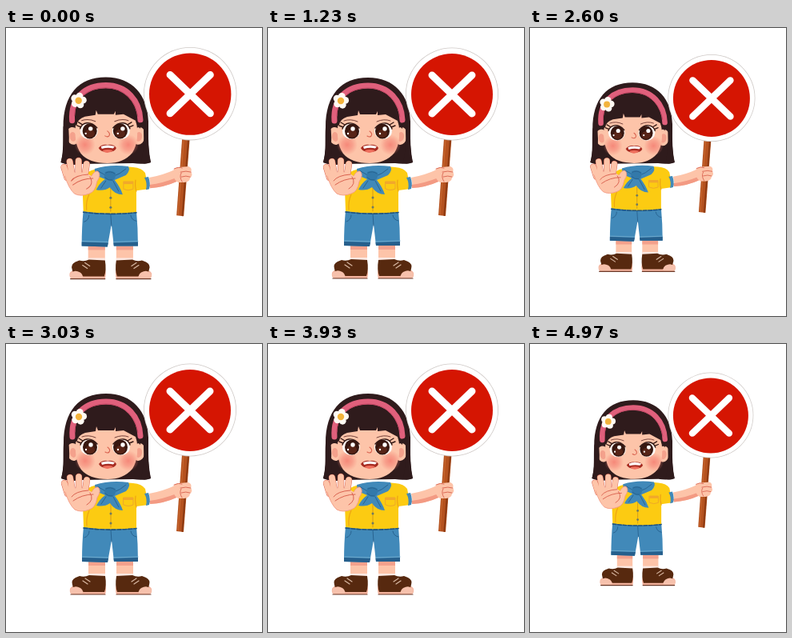
Recreate the animation shown at these times as an HTML page with a canvas. Size 320 by 360 pixels, loop 5.01 s.

```html
<!DOCTYPE html>
<html lang="en">
<head>
<meta charset="utf-8">
<title>Girl with a stop sign</title>
<style>
html, body { margin: 0; width: 100%; height: 100%; overflow: hidden; background: #fff; }
canvas { display: block; width: 320px; height: 360px; }
</style>
</head>
<body>
<canvas id="stage" width="320" height="360"></canvas>
<script>
const ctx = document.getElementById('stage').getContext('2d');
const LOOP = 5010, STEPS = 150, BEAT = 27;
const PIVOT = { x: 177.5, y: 167 };
const C = {
  hair: '#2f1b1c', skin: '#fdc4a9', shade: '#f39a83', line: '#d9624f',
  band: '#e0607c', red: '#d51502', yellow: '#fccb12', gold: '#eda313',
  blue: '#4189b9', navy: '#265f8c', brown: '#57290f', wood: '#b5521f'
};

// Scale over one beat: [step, scale]
const KEYS = [[0, 1.004], [4, 1.135], [5, 1.137], [9, 1.027], [10, 1],
  [14, 0.922], [16, 0.89], [18.5, 0.868], [21, 0.89], [23, 0.922], [26, 0.979], [27, 1.004]];

function scaleAt(step) {
  const p = step % BEAT;
  const i = KEYS.findIndex(k => k[0] > p);
  const [a, s] = KEYS[i - 1], [b, e] = KEYS[i];
  return s + (e - s) * (p - a) / (b - a);
}

function stepAt(ms) {
  let n = Math.min(STEPS - 1, Math.ceil(ms * 0.03) + 1);
  while (n > 0 && Math.round(n * 10 / 3) * 10 > ms) n--;
  return n;
}

function fill(d, color) {
  ctx.fillStyle = color;
  ctx.fill(new Path2D(d));
}

function stroke(d, color, width = 1) {
  ctx.strokeStyle = color;
  ctx.lineWidth = width;
  ctx.stroke(new Path2D(d));
}

function oval(x, y, rx, ry, color, turn = 0) {
  ctx.beginPath();
  ctx.ellipse(x, y, rx, ry, turn, 0, Math.PI * 2);
  ctx.fillStyle = color;
  ctx.fill();
}

function dot(x, y, r, color) {
  oval(x, y, r, r, color);
}

function glow(x, y, r) {
  const g = ctx.createRadialGradient(x, y, 0, x, y, r);
  g.addColorStop(0, 'rgba(243,116,105,.75)');
  g.addColorStop(0.5, 'rgba(243,125,112,.5)');
  g.addColorStop(1, 'rgba(243,130,115,0)');
  dot(x, y, r, g);
}

function sign() {
  fill('M220 138 L229.5 138 L222 235 L213 234Z', C.wood);
  stroke('M227.8 140 L220.4 234', '#8c3a12', 2);
  stroke('M222 140 L215 233', '#c96a31', 1);
  dot(230, 82.5, 58, '#cfc9c6');
  dot(230, 82.5, 57.2, '#fff');
  dot(230, 83, 51, C.red);
  stroke('M205 59 L255 107 M255 59 L205 107', '#fff', 9);
}

function hairBack() {
  fill('M69 168 C73 154 71 139 72 124 C72 84 91 62 125 62 C158 62 177 84 178 117 C178 139 177 153 181 168 Q172 171 159 169 L92 170 Q80 173 69 168Z', C.hair);
}

function legs() {
  for (const x of [103, 138]) {
    ctx.fillStyle = C.skin;
    ctx.fillRect(x, 270, 21, 24);
    ctx.fillStyle = '#f4a18c';
    ctx.fillRect(x, 272, 21, 5);
    ctx.fillStyle = '#fbe9e3';
    ctx.fillRect(x, 287, 21, 8);
  }
  shoe();
  ctx.save();
  ctx.translate(262, 0);
  ctx.scale(-1, 1);
  shoe();
  ctx.restore();
}

function shoe() {
  fill('M80 306 Q82 302 88 302 L124 300 Q126 307 124 313 L83 313 Q79 312 80 306Z', '#f4b39d');
  fill('M83 301 Q81 295 87 292 L92 290 Q98 292 104 289 L124 290 Q126 302 123 310 L97 310 Q90 306 84 305 Z', C.brown);
  fill('M81 306 Q86 301 93 305 Q97 308 96 312 L82 312 Q79 310 81 306Z', '#f6c1ac');
  stroke('M81 313 H124', '#6b3928', 1.2);
  stroke('M99 293 L105 297 M96 296 L102 300', '#d9b9a4', 1.2);
}

function shorts() {
  fill('M97 228 L163 228 Q165 250 165 272 L135 272 L132 245 L127 273 L95 272 Q95 248 97 228Z', C.blue);
  fill('M95 267 L128 268 L127 273 L95 272Z M134.5 268 L165 267 L165 272 L135 272Z', C.navy);
  stroke('M96 266 L128 267 M135 267 L165 266', '#70abcd', 1);
  stroke('M131 232 L132 247 M104 234 Q104 240 98 242 M156 234 Q157 240 163 241', C.navy, 0.9);
}

function shirt() {
  fill('M107 178 Q130 171 159 174 Q170 175 174 181 L178 201 L163 203 L163 230 Q130 234 97 229 L96 201 L101 181Z', C.yellow);
  fill('M173 187 L178 186 Q181 194 179 201 L175 202 Q177 194 173 187Z', C.blue);
  stroke('M162 190 Q161 198 163 204 M104 208 Q100 217 101 227', C.gold, 1.2);
  stroke('M147 192 H159 V201 Q153 204 147 201 Z', '#eda72a', 1);
  fill('M147 192 H159 V195 H147Z', '#f2a82b');
  stroke('M131 200 V229', '#d49a19', 1);
  for (const y of [212, 224]) dot(131, y, 1.5, '#6e7a62');
  ctx.setLineDash([5, 2]);
  stroke('M97 230 Q130 234 163 230.5', '#20517a', 1.6);
  ctx.setLineDash([]);
}

function scarf() {
  fill('M111 176 Q130 170 153 173 Q156 178 150 184 L136 190 Q143 199 146 208 Q136 208 130 199 Q123 204 113 202 Q117 194 124 189 L112 184Z', C.blue);
  stroke('M114 178 Q123 183 128 186 M150 176 Q142 183 135 185 M125 191 L119 200 M134 191 L141 204', C.navy, 0.9);
  fill('M124 180 Q131 177 137 181 Q138 188 133 191 Q126 191 123 187Z', '#3379aa');
  stroke('M125 181 Q131 178 136 182 M124 187 Q128 191 133 190', '#245d89', 0.8);
}

function signArm() {
  fill('M179 187 Q196 184 211 177 Q217 183 213 192 Q198 199 180 200 Q181 193 179 187Z', C.skin);
  fill('M179 196 Q196 194 213 187 Q215 190 213 192 Q198 199 180 200Z', C.shade);
  fill('M209 179 Q210 174 217 174 L228 173 Q233 175 231 180 Q234 184 230 187 Q230 192 223 193 L215 193 Q208 189 209 179Z', C.skin);
  stroke('M218 180 Q225 178 231 180 M219 186 Q225 184 230 186 M219 181 Q216 186 220 192 M210 176 Q216 173 220 175', C.line, 0.9);
}

function face() {
  for (const [x, turn] of [[84, -0.15], [166, 0.15]]) {
    oval(x, 135, 8, 11, C.skin, turn);
    oval(x, 136, 4, 6, '#f4a18c', turn);
  }
  fill('M88 116 Q88 98 126 98 Q163 98 163 118 Q167 142 158 156 Q147 169 127 169 Q104 169 94 157 Q84 143 88 116Z', C.skin);
  glow(99, 146, 13);
  glow(153, 146, 13);
  for (const side of [-1, 1]) eye(124 + side * 20, side);
  stroke('M127 129 Q131 132 129 135 Q127 137 124 135', C.line, 1.1);
  fill('M116 150 Q120 145 127 146 Q135 145 138 150 Q137 155 127 155 Q118 155 116 150Z', '#a72b21');
  fill('M119 148 Q127 145 136 148 L134 150.5 Q127 149 120 151Z', '#fff');
  fill('M121 153 Q127 151 134 153 Q131 156 127 156 Q123 156 121 153Z', '#ef705e');
}

function eye(x, side) {
  oval(x, 129, 11, 10, '#fffaf6');
  oval(x - side, 129, 9, 9.5, '#371710');
  oval(x - side, 132, 6, 5, '#572417');
  dot(x + 2, 126, 2.7, '#fff');
  dot(x - 4, 132, 1.2, '#fff');
  ctx.save();
  ctx.translate(x, 0);
  ctx.scale(side, 1);
  stroke('M-10 125 Q-4 118 3 119 Q9 120 11 126 M8 121 L13 118 M10 124 L15 122', '#321814', 1.4);
  stroke('M-8 117 Q1 113 9 116', '#74413a', 1);
  ctx.restore();
}

function fringe() {
  fill('M82 124 Q80 94 104 78 Q127 68 149 79 Q170 92 168 126 Q163 122 162 116 L147 108 L137 109 L137 104 L135 108 L115 108 L113 103 L112 109 L99 111 Q90 114 89 121 Q86 124 82 124Z', C.hair);
  stroke('M83 116 C81 87 100 72 125 72 C151 72 167 91 168 115', C.band, 7);
  stroke('M86 110 C86 88 103 75 125 75 C147 75 162 91 165 111', '#c34865', 1);
  fill('M76 112 Q80 126 79 147 Q79 159 83 169 Q75 171 69 168 Q74 150 72 124Z M173 112 L178 117 Q177 149 181 168 Q174 171 169 169 Q173 148 172 128Z', C.hair);
  flower(91, 91);
}

function flower(x, y) {
  for (let i = 0; i < 5; i++) {
    const a = i * Math.PI * 0.4 - 1.35;
    dot(x + 5.7 * Math.cos(a), y + 5.7 * Math.sin(a), 4.4, '#fffaf3');
  }
  dot(x, y, 4.2, '#f3b33c');
}

function openHand() {
  const fingers = 'M77 187 L73 174 M83 184 L80 167 M91 182 L91 166 M99 184 L101 170';
  stroke(fingers, C.line, 8.3);
  stroke(fingers, C.skin, 7.4);
  fill('M74 185 Q83 178 101 181 L107 185 Q111 178 115 179 Q120 183 114 192 Q112 205 104 207 Q94 211 86 207 Q79 201 74 185Z', C.skin);
  stroke('M74 185 Q79 201 86 207 Q94 211 104 207 Q112 205 114 192 Q120 183 115 179 Q111 178 107 185', C.shade, 0.9);
  stroke('M82 191 Q87 184 103 183 M84 196 Q95 188 109 188 M105 186 Q111 195 101 201', C.line, 1);
}

function draw(ms) {
  const s = scaleAt(stepAt(ms));
  ctx.setTransform(1, 0, 0, 1, 0, 0);
  ctx.fillStyle = '#fff';
  ctx.fillRect(0, 0, 320, 360);
  ctx.translate(PIVOT.x, PIVOT.y);
  ctx.scale(s, s);
  ctx.translate(-PIVOT.x, -PIVOT.y);
  ctx.lineCap = ctx.lineJoin = 'round';
  for (const part of [hairBack, sign, legs, shorts, signArm, shirt, scarf, face, fringe, openHand]) part();
}

const start = performance.now();
function tick() {
  draw((performance.now() - start) % LOOP);
  requestAnimationFrame(tick);
}
draw(0);
requestAnimationFrame(tick);
</script>
</body>
</html>
```
